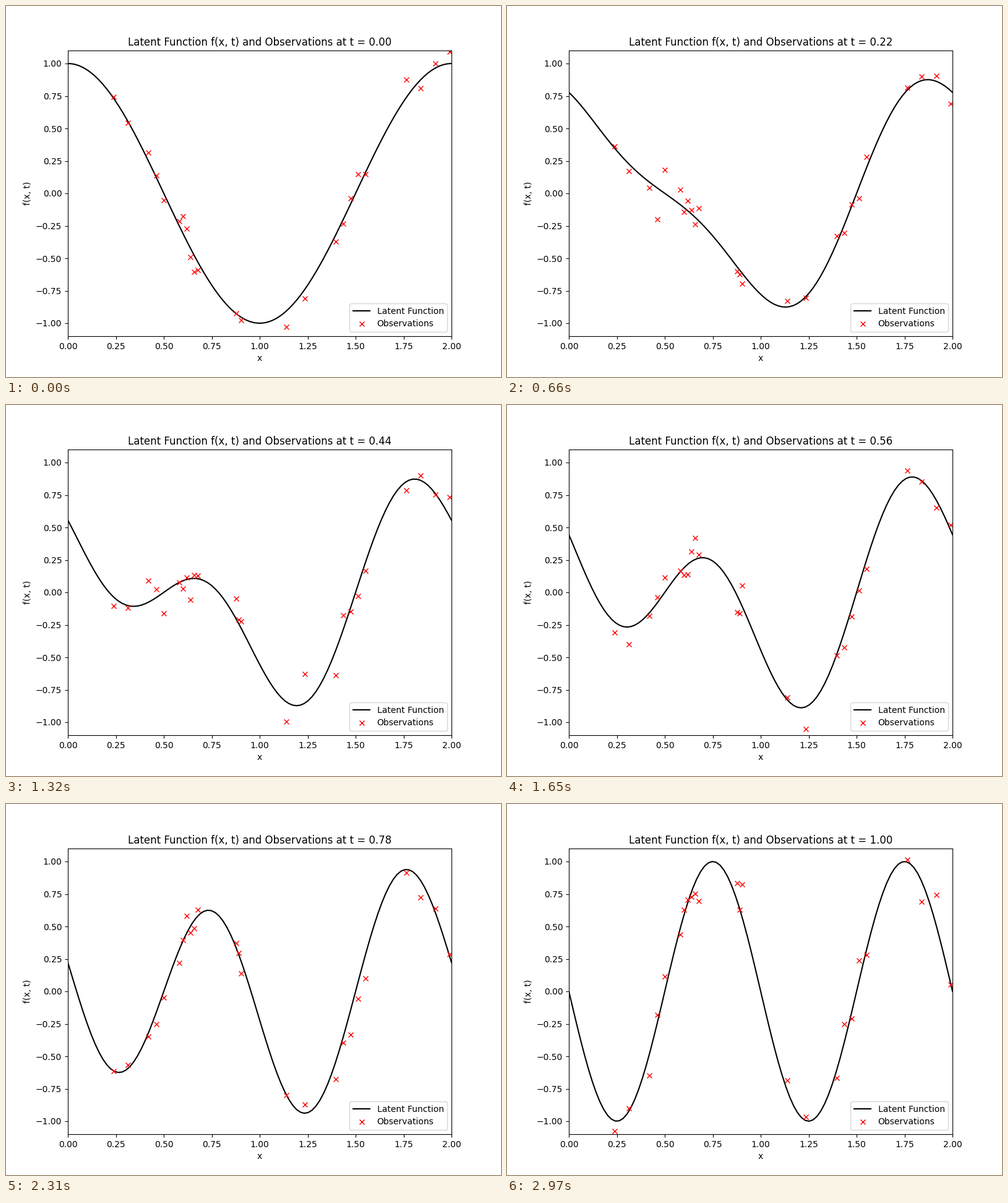
These frames come from a looping animation (800x600 px, 3.3 s). A matplotlib script:

```python
import numpy as np
import matplotlib.pyplot as plt
from matplotlib.animation import FuncAnimation

STEPS = 10
INTERVAL = 330
NOISE = 0.1

# Clusters of evenly spaced samples: first x, last x, count
CLUSTERS = [(0.24, 0.313, 2), (0.42, 0.50, 3), (0.58, 0.678, 6),
            (0.878, 0.903, 3), (1.139, 1.236, 2), (1.397, 1.552, 5),
            (1.765, 1.99, 4)]
SAMPLE_X = np.concatenate([np.linspace(*cluster) for cluster in CLUSTERS])


def latent(x, t):
    """Blend a cosine into a faster, inverted sine."""
    return (1 - t) * np.cos(np.pi * x) - t * np.sin(2 * np.pi * x)


def observe(step, t):
    """Sample the function with fresh Gaussian noise at each step."""
    rng = np.random.default_rng(step)
    return latent(SAMPLE_X, t) + rng.normal(0, NOISE, SAMPLE_X.size)


fig, ax = plt.subplots(figsize=(8, 6), dpi=100)
grid = np.linspace(0, 2, 100)
curve, = ax.plot(grid, latent(grid, 0), "k-", label="Latent Function")
marks, = ax.plot(SAMPLE_X, observe(0, 0), "rx", label="Observations")
ax.set(xlim=(0, 2), ylim=(-1.1, 1.1), xlabel="x", ylabel="f(x, t)")
ax.legend(loc="lower right")


def update(step):
    t = step / (STEPS - 1)
    curve.set_ydata(latent(grid, t))
    marks.set_ydata(observe(step, t))
    ax.set_title(f"Latent Function f(x, t) and Observations at t = {t:.2f}")
    return curve, marks


anim = FuncAnimation(fig, update, frames=STEPS, interval=INTERVAL,
                     repeat=True, repeat_delay=0)
plt.show()
```
